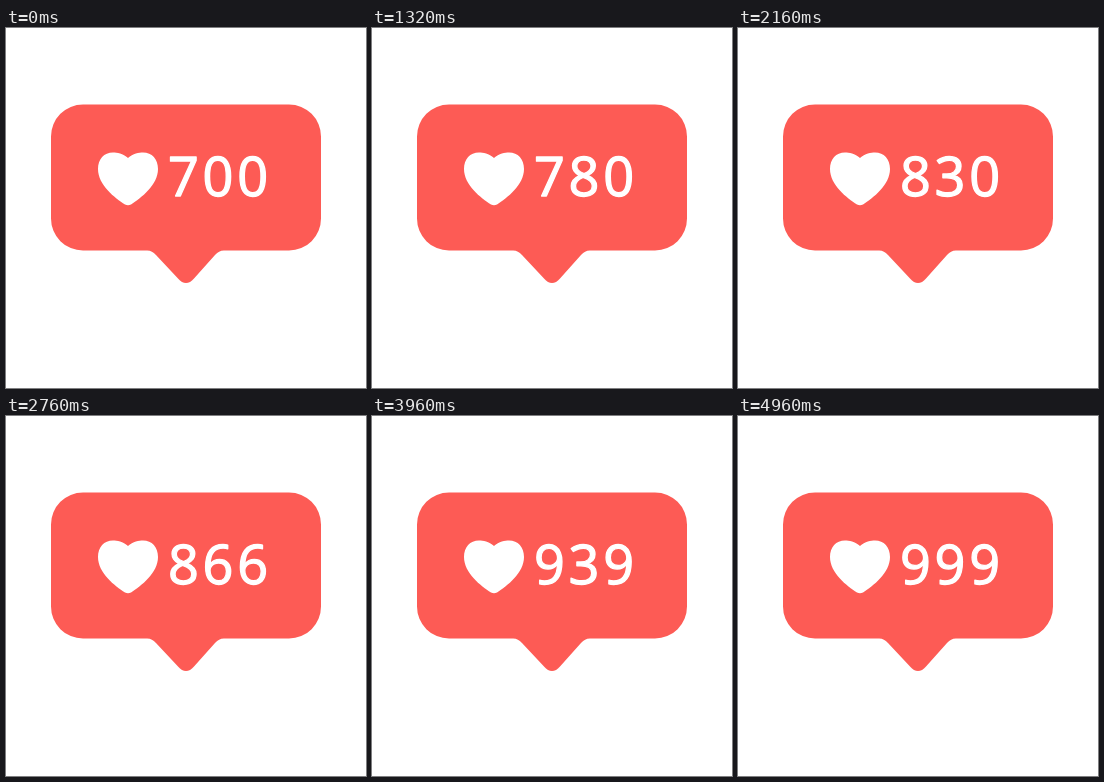
An HTML page for the animation above (5000 ms loop, 360 by 360 pixels).

```html
<!DOCTYPE html>
<html lang="en">
<head>
<meta charset="utf-8">
<title>Like counter</title>
<style>
  html, body { margin: 0; width: 100%; height: 100%; overflow: hidden; background: #fff; }
  svg { display: block; width: 100vw; height: 100vh; }
  text {
    font: 400 54px "Open Sans", "Noto Sans", sans-serif;
    font-kerning: none;
    fill: #fff;
    stroke: #fff;
    stroke-width: 1.3;
    stroke-linejoin: round;
  }
</style>
</head>
<body>
<svg viewBox="0 0 360 360">
  <path fill="#fd5b55" d="M77 76.5H283A32 32 0 0 1 315 108.5V190.5A32 32 0 0 1 283 222.5H218
    C214 222.5 212 224 209 227L188 250.5Q180 259.5 172 250.5L150 227C147 224 145 222.5 141 222.5H77
    A32 32 0 0 1 45 190.5V108.5A32 32 0 0 1 77 76.5Z"/>
  <path fill="#fff" d="M122 130C117 125.5 111 124.5 107 124.5C98 124.5 92 131 92 141C92 157 109 170 119 176.5
    Q122 178 125 176.5C135 170 152 157 152 141C152 131 146 124.5 137 124.5C133 124.5 127 125.5 122 130Z"/>
  <text id="count" y="168">700</text>
</svg>
<script>
  const LOOP = 5000, STEP = 40, FROM = 700, TO = 999;
  const LEFT = 162, ADVANCE = 34.6, KERN_74 = -3;
  const label = document.getElementById('count');
  const last = LOOP / STEP - 1;
  let shown = '';

  // Fixed digit pitch, with "74" tucked together.
  function digitPositions(digits) {
    let x = LEFT;
    return [...digits].map((d, i) => {
      if (i) x += ADVANCE + (digits[i - 1] + d === '74' ? KERN_74 : 0);
      return x;
    }).join(' ');
  }

  function draw(now) {
    const step = Math.floor((now % LOOP) / STEP);
    const digits = String(Math.round(FROM + (TO - FROM) * step / last));
    if (digits !== shown) {
      shown = digits;
      label.textContent = digits;
      label.setAttribute('x', digitPositions(digits));
    }
  }

  function tick() {
    draw(performance.now());
    requestAnimationFrame(tick);
  }
  tick();
</script>
</body>
</html>
```
